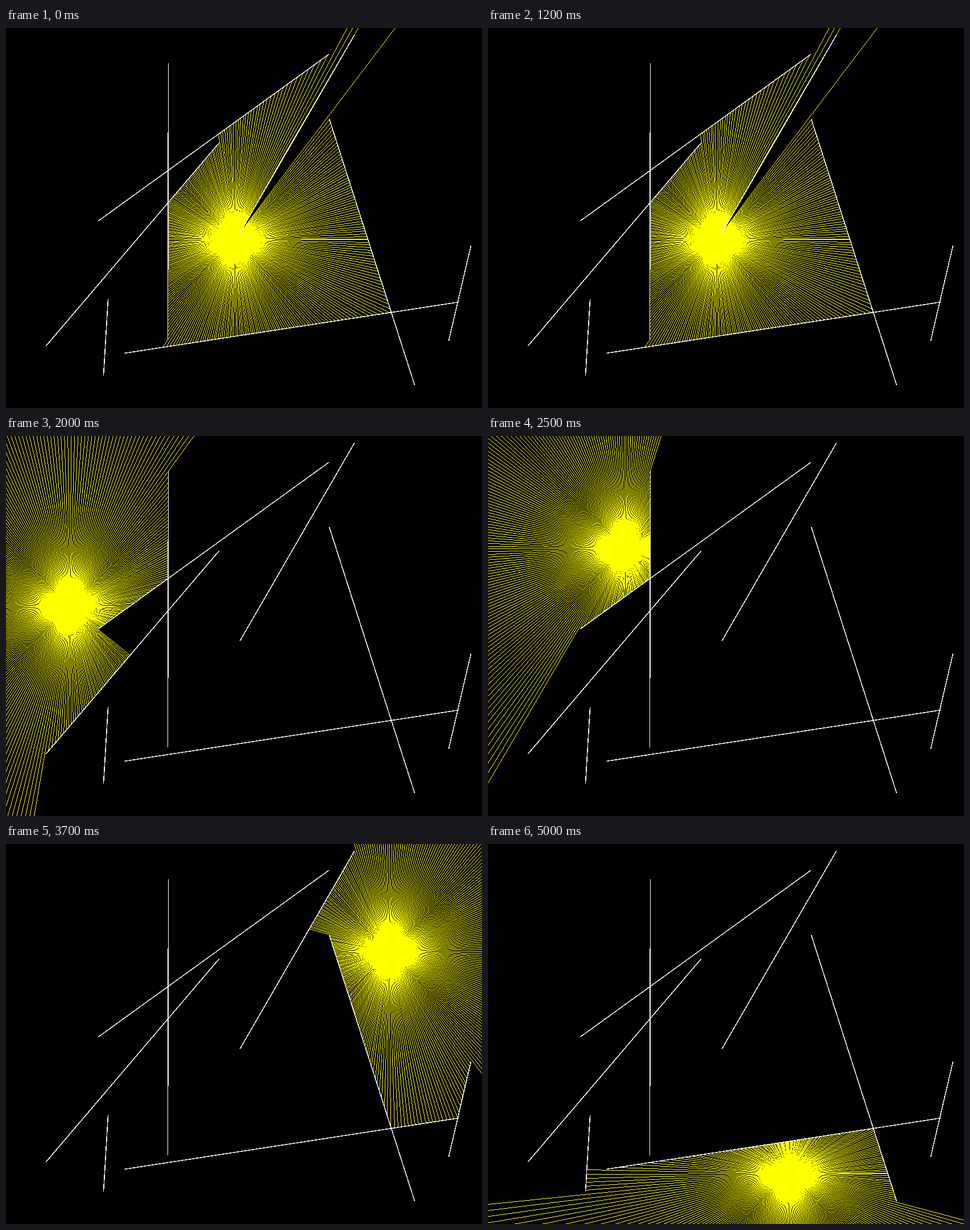
These frames come from a looping animation (837x669 px, 5.1 s). An HTML page with a canvas:

```html
<!DOCTYPE html>
<html lang="en">
<head>
<meta charset="utf-8">
<title>Ray casting</title>
<style>
  html, body { margin: 0; width: 100%; height: 100%; overflow: hidden; background: #000; }
  canvas { display: block; }
</style>
</head>
<body>
<canvas id="stage" width="837" height="669"></canvas>
<script>
const W = 837, H = 669, LOOP = 5100, STEP = 100;
const REACH = 2000, RAY_STEP = 0.02, WALL_WIDTH = 1.5;
const ctx = document.getElementById('stage').getContext('2d');
const image = ctx.createImageData(W, H);
const pixels = new Uint32Array(image.data.buffer);

// ABGR
const BLACK = 0xff000000, YELLOW = 0xff00ffff, WHITE = 0xffffffff;

const walls = [
  [285, 62, 284, 547],
  [567, 46, 162, 339],
  [612, 12, 411, 360],
  [374, 202, 70, 559],
  [568, 160, 718, 628],
  [208, 572, 796, 482],
  [179, 477, 171, 611],
  [817, 383, 778, 550]
];

// Key points of the light: time, x, y
const path = [
  [0, 402, 372], [400, 345, 355], [800, 420, 308], [1200, 402, 372],
  [1600, 162, 445], [2000, 112, 300], [2500, 241, 198], [3000, 365, 152],
  [3300, 500, 75], [3700, 673, 189], [4200, 588, 436], [4400, 585, 436],
  [4800, 485, 489], [5000, 529, 580]
];

function slope(i, axis) {
  const a = path[Math.max(i - 1, 0)];
  const b = path[Math.min(i + 1, path.length - 1)];
  return (b[axis] - a[axis]) / (b[0] - a[0]);
}

// Cubic Hermite through the key points
function lightAt(t) {
  let i = 0;
  while (i < path.length - 2 && t >= path[i + 1][0]) i++;
  const a = path[i], b = path[i + 1];
  const h = b[0] - a[0], u = (t - a[0]) / h, v = 1 - u;
  return [1, 2].map(k => Math.round(
    a[k] * (1 + 2 * u) * v * v + b[k] * u * u * (3 - 2 * u) +
    h * u * v * (slope(i, k) * v - slope(i + 1, k) * u)));
}

function plot(x, y, color) {
  if (x >= 0 && x < W && y >= 0 && y < H) pixels[y * W + x] = color;
}

// Hard-edged line; `half` is half its extent along the minor axis
function line(x1, y1, x2, y2, color, half = 0.5) {
  const dx = x2 - x1, dy = y2 - y1;
  const steep = Math.abs(dy) > Math.abs(dx);
  const count = Math.max(Math.abs(dx), Math.abs(dy));
  for (let n = 0; n <= count; n++) {
    const f = count ? n / count : 0;
    const x = x1 + dx * f, y = y1 + dy * f;
    const major = Math.round(steep ? y : x), mid = steep ? x : y;
    for (let m = Math.ceil(mid - half); m < mid + half; m++) {
      if (steep) plot(m, major, color);
      else plot(major, m, color);
    }
  }
}

function drawWall([x1, y1, x2, y2]) {
  const dx = Math.abs(x2 - x1), dy = Math.abs(y2 - y1);
  line(x1, y1, x2, y2, WHITE, WALL_WIDTH / 2 * Math.hypot(dx, dy) / Math.max(dx, dy));
}

// Distance along the ray to the nearest wall
function cast(px, py, dx, dy) {
  let best = REACH;
  for (const [x1, y1, x2, y2] of walls) {
    const wx = x2 - x1, wy = y2 - y1;
    const det = dx * wy - dy * wx;
    if (Math.abs(det) < 1e-9) continue;
    const ox = x1 - px, oy = y1 - py;
    const dist = (ox * wy - oy * wx) / det;
    const along = (ox * dy - oy * dx) / det;
    if (dist > 0 && dist < best && along >= 0 && along <= 1) best = dist;
  }
  return best;
}

function draw(t) {
  pixels.fill(BLACK);
  const [px, py] = lightAt(t);
  for (let a = 0; a < 2 * Math.PI; a += RAY_STEP) {
    const dx = Math.cos(a), dy = Math.sin(a);
    const d = cast(px, py, dx, dy);
    line(px, py, Math.round(px + dx * d), Math.round(py + dy * d), YELLOW);
  }
  walls.forEach(drawWall);
  ctx.putImageData(image, 0, 0);
}

let shown = -1;
const start = performance.now();
function tick() {
  const step = Math.floor(((performance.now() - start) % LOOP) / STEP);
  if (step !== shown) draw((shown = step) * STEP);
  requestAnimationFrame(tick);
}
tick();
</script>
</body>
</html>
```
